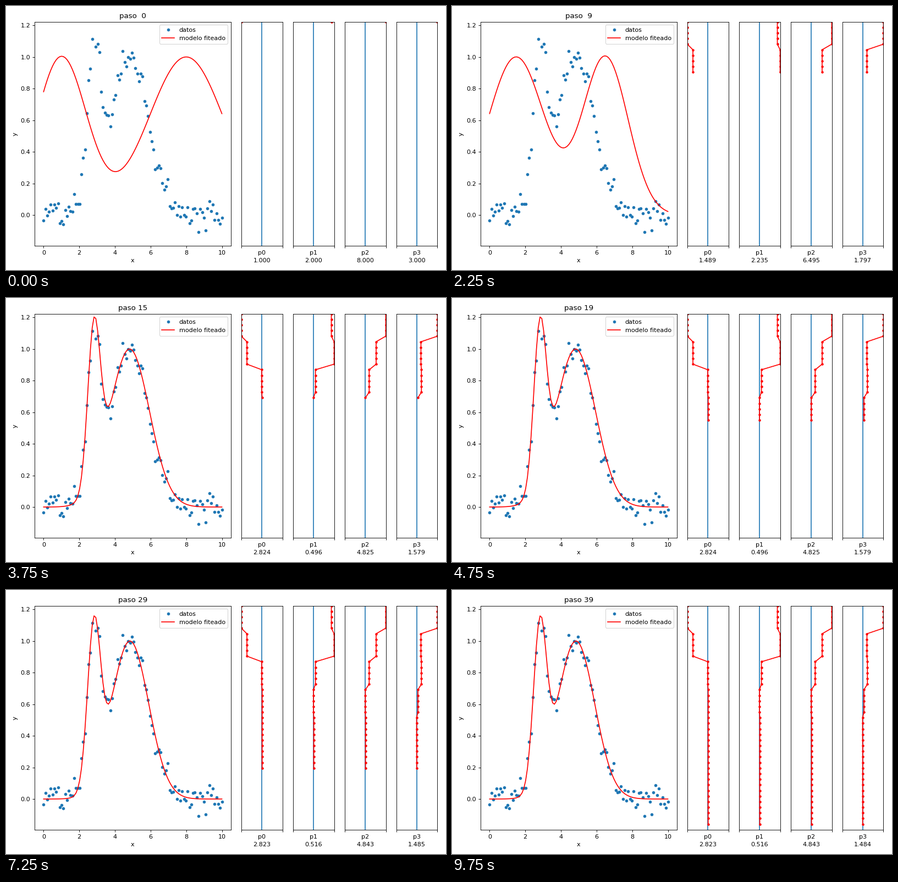
Recreate the animation shown at these times as a matplotlib script. Size 800 px wide and 480 px high, loop 10000 ms.

```python
import numpy as np
import matplotlib.pyplot as plt
from matplotlib.animation import FuncAnimation

W, H, DPI = 800, 480, 80
STEPS = 40
EVALS = 5  # model evaluations per fit iteration
POINTS = 100
NOISE = 0.05

TRUE = np.array([2.8, 0.5, 4.8, 1.5])
# parameters after each fit iteration; the last one stays
FITS = np.array([
    [1.000, 2.000, 8.000, 3.000],
    [1.489, 2.235, 6.495, 1.797],
    [2.790, 0.658, 5.417, 1.831],
    [2.824, 0.496, 4.825, 1.579],
    [2.822, 0.519, 4.847, 1.479],
    [2.823, 0.516, 4.843, 1.485],
    [2.823, 0.516, 4.843, 1.484],
])

x = np.linspace(0, 10, POINTS)


def model(p):
    """Two unit bumps with centres p0, p2 and widths p1, p3."""
    return np.exp(-((x - p[0]) / p[1]) ** 2) + np.exp(-((x - p[2]) / p[3]) ** 2)


rng = np.random.RandomState(13)
y = model(TRUE) + NOISE * rng.randn(POINTS)

steps = np.arange(STEPS)
history = FITS[np.minimum(steps // EVALS, len(FITS) - 1)]
reach = np.abs(history - TRUE).max(axis=0)

fig = plt.figure(figsize=(W / DPI, H / DPI), dpi=DPI)
grid = fig.add_gridspec(1, 8, left=52.14 / W, right=784.45 / W,
                        bottom=44.2 / H, top=451.33 / H, wspace=19.13 / 74.8)

ax = fig.add_subplot(grid[0, :4])
ax.plot(x, y, "o", ms=4, label="datos")
curve, = ax.plot(x, model(history[0]), "r-", label="modelo fiteado")
ax.set(xlabel="x", ylabel="y", ylim=(-0.194, 1.2224))
ax.legend(loc="upper right")
title = ax.set_title("")


def make_panel(i):
    """Panel tracing one parameter downwards, centred on its true value."""
    panel = fig.add_subplot(grid[0, 4 + i])
    limits = (TRUE[i] - reach[i], TRUE[i] + reach[i])
    panel.axvline(TRUE[i])
    trail, = panel.plot([], [], "r.-")
    panel.set(xlim=limits, ylim=(STEPS, 0), yticks=[])
    panel.set_xticks(limits, ["", ""])
    # the name sits level with the tick labels, without a tick mark
    panel.set_xticks([TRUE[i]], [f"p{i}"], minor=True)
    panel.tick_params(axis="x", which="minor", length=0, pad=7)
    return panel, trail


panels = [make_panel(i) for i in range(4)]


def update(step):
    p = history[step]
    title.set_text(f"paso {step:2d}")
    curve.set_ydata(model(p))
    for i, (panel, trail) in enumerate(panels):
        trail.set_data(history[:step + 1, i], steps[:step + 1])
        panel.set_xlabel(f"{p[i]:.3f}")
    return []


anim = FuncAnimation(fig, update, frames=STEPS, interval=250,
                     repeat=True, repeat_delay=0)
plt.show()
```
